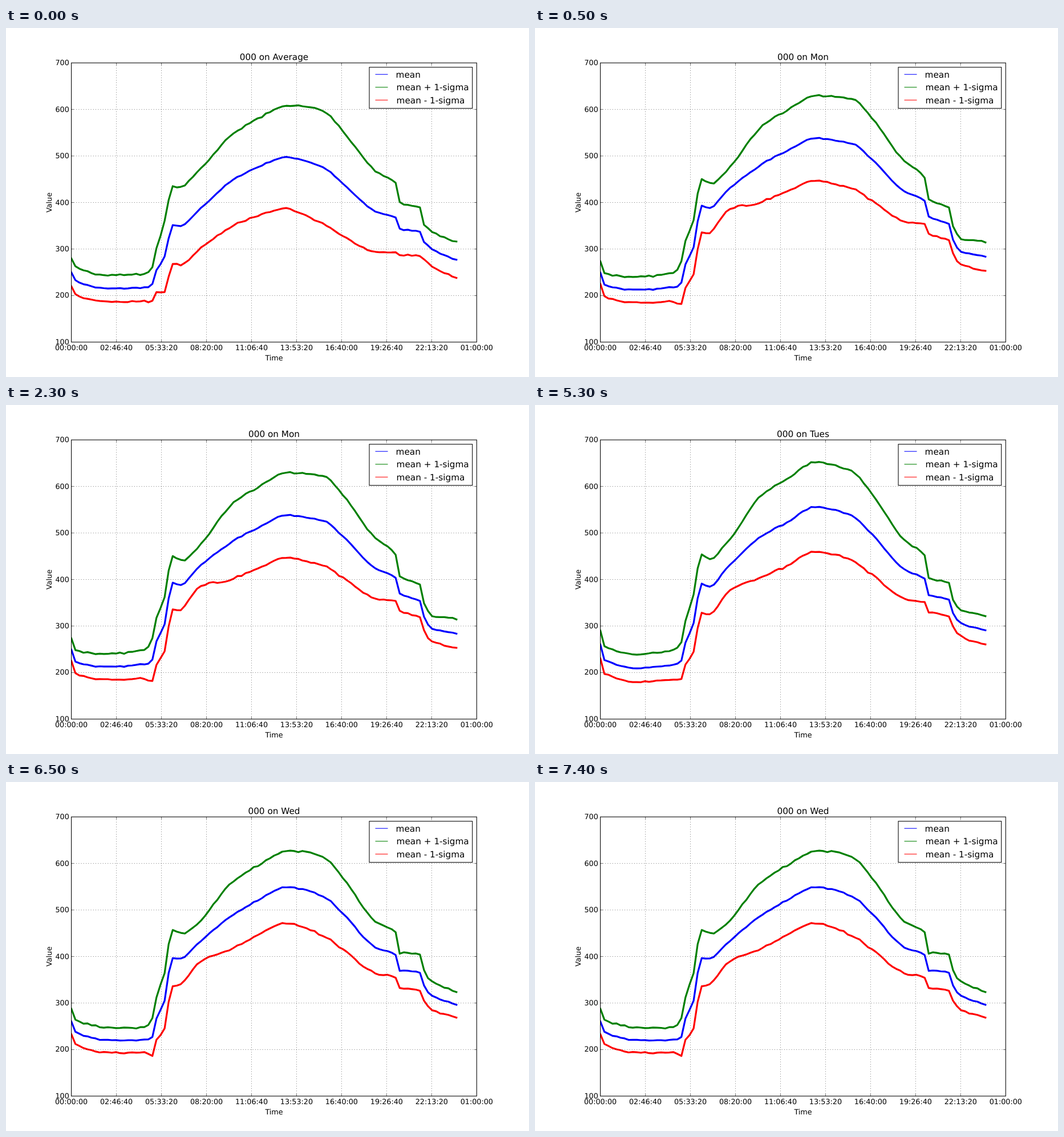
Write an HTML page that moves like this. It is 917 by 611 pixels and loops after 8 s.

```html
<!DOCTYPE html>
<html lang="en">
<head>
<meta charset="utf-8">
<title>Daily profile</title>
<style>
html, body { margin: 0; width: 100%; height: 100%; overflow: hidden; background: #fff; }
svg { display: block; width: 100%; height: 100%; }
text { font: 12.73px "DejaVu Sans", sans-serif; fill: #000; text-anchor: middle; text-rendering: geometricPrecision; }
.big { font-size: 15.28px; }
.end { text-anchor: end; }
.start { text-anchor: start; }
.box { fill: none; stroke: #000; stroke-width: 1.06; }
.key { stroke-width: 1.06; }
.grid { stroke: #000; stroke-width: .53; stroke-dasharray: 1.06 3.18; }
.tick { stroke: #000; stroke-width: .53; }
.curve { fill: none; stroke-width: 3.18; stroke-linejoin: round; stroke-linecap: square; }
.day { visibility: hidden; animation: 8s step-end infinite; }
.avg { animation-name: avg; }
.mon { animation-name: mon; }
.tue { animation-name: tue; }
.wed { animation-name: wed; }
@keyframes avg { 0% { visibility: visible } 6.25%, 100% { visibility: hidden } }
@keyframes mon { 0% { visibility: hidden } 6.25% { visibility: visible } 43.75%, 100% { visibility: hidden } }
@keyframes tue { 0% { visibility: hidden } 43.75% { visibility: visible } 81.25%, 100% { visibility: hidden } }
@keyframes wed { 0% { visibility: hidden } 81.25%, 100% { visibility: visible } }
</style>
</head>
<body>
<svg viewBox="0 0 917 611">
  <defs><clipPath id="plot"><rect x="114.6" y="61.1" width="710.7" height="488.8"/></clipPath></defs>
  <g id="days"></g>
  <g id="axes"></g>
  <g id="legend"></g>
</svg>
<script>
const L = 114.6, R = 825.3, T = 61.1, B = 549.9;
const QUARTERS = 96; // one sample every 15 minutes
const BLUE = '#00f', GREEN = '#008000', RED = '#f00';

const get = id => document.getElementById(id);
const toX = quarter => L + (R - L) * quarter / 100;
const toY = value => B - (B - T) * (value - 100) / 600;

function add(parent, tag, attrs, label) {
  const el = document.createElementNS('http://www.w3.org/2000/svg', tag);
  for (const k in attrs) el.setAttribute(k, attrs[k]);
  if (label) el.textContent = label;
  parent.appendChild(el);
  return el;
}

const line = (parent, cls, x1, y1, x2, y2, stroke) =>
  add(parent, 'line', { class: cls, x1, y1, x2, y2, ...(stroke && { stroke }) });
const text = (parent, cls, x, y, label) => add(parent, 'text', { class: cls, x, y }, label);

// Monotone cubic through the key points
function smooth(xs, ys) {
  const last = xs.length - 1;
  const slope = i => (ys[i + 1] - ys[i]) / (xs[i + 1] - xs[i]);
  const tangent = i => {
    if (i === 0) return slope(0);
    if (i === last) return slope(last - 1);
    const a = slope(i - 1), b = slope(i);
    return a * b > 0 ? 2 * a * b / (a + b) : 0;
  };
  return x => {
    let i = 0;
    while (i < last - 1 && x > xs[i + 1]) i++;
    const h = xs[i + 1] - xs[i], t = (x - xs[i]) / h, u = 1 - t;
    return u * u * (1 + 2 * t) * ys[i] + t * t * (3 - 2 * t) * ys[i + 1]
      + h * t * u * (u * tangent(i) - t * tangent(i + 1));
  };
}

let seed = 7;
function jitter(size) {
  seed = (seed * 16807) % 2147483647;
  return (seed / 2147483647 - .5) * size;
}

// Quarter hours at which mean and sigma change course
const meanAt = [0, 1, 9, 19, 20, 21, 23, 24, 25, 27, 31, 40, 46, 53, 62, 67, 75, 80, 81, 86, 87, 89, 95];
const sigmaAt = [0, 18, 20, 24, 31, 40, 53, 62, 75, 80, 81, 86, 87, 95];

function curve(parent, values, stroke) {
  const points = values.map((v, i) => `${toX(i).toFixed(1)},${toY(v).toFixed(1)}`).join(' ');
  add(parent, 'polyline', { class: 'curve', points, stroke });
}

function day(cls, name, means, sigmas) {
  const g = add(get('days'), 'g', { class: 'day ' + cls });
  text(g, 'big', 470, 55.8, '000 on ' + name);
  const plot = add(g, 'g', { 'clip-path': 'url(#plot)' });
  const sample = f => Array.from({ length: QUARTERS }, (_, i) => f(i) + jitter(2.4));
  const mean = sample(smooth(meanAt, means));
  const sigma = sample(smooth(sigmaAt, sigmas));
  curve(plot, mean, BLUE);
  curve(plot, mean.map((m, i) => m + sigma[i]), GREEN);
  curve(plot, mean.map((m, i) => m - sigma[i]), RED);
}

day('avg', 'Average',
  [251, 232, 215, 218, 224, 254, 284, 322, 351, 349, 380, 449, 476, 497, 476, 440, 381, 367, 343, 338, 316, 300, 276],
  [29, 29, 37, 82, 85, 99, 110, 121, 87, 74, 56, 52, 37, 39]);
day('mon', 'Mon',
  [250, 223, 212, 220, 229, 268, 305, 359, 392, 389, 423, 483, 511, 538, 527, 492, 424, 403, 369, 353, 319, 295, 283],
  [25, 31, 45, 59, 44, 82, 91, 96, 65, 49, 36, 36, 28, 31]);
day('tue', 'Tues',
  [261, 228, 210, 218, 225, 263, 306, 359, 392, 384, 423, 495, 522, 556, 537, 497, 421, 401, 367, 356, 327, 307, 290],
  [29, 31, 40, 64, 54, 89, 96, 95, 63, 50, 36, 36, 28, 31]);
day('wed', 'Wed',
  [260, 238, 220, 221, 228, 267, 305, 365, 397, 396, 426, 490, 521, 549, 530, 492, 420, 403, 370, 366, 337, 316, 296],
  [27, 27, 40, 61, 44, 72, 77, 84, 56, 48, 38, 38, 32, 28]);

const axes = get('axes');
const pad = n => String(Math.floor(n)).padStart(2, '0');
const clock = s => [s / 3600 % 24, s / 60 % 60, s % 60].map(pad).join(':');

for (let i = 0; i < 10; i++) {
  const x = L + (R - L) * i / 9;
  if (i % 9) {
    line(axes, 'grid', x, B, x, T);
    line(axes, 'tick', x, B, x, B - 4.3);
    line(axes, 'tick', x, T, x, T + 4.3);
  }
  text(axes, '', x, 564.3, clock(i * 10000));
}
for (let v = 100; v <= 700; v += 100) {
  const y = toY(v);
  if (v > 100 && v < 700) {
    line(axes, 'grid', L, y, R, y);
    line(axes, 'tick', L, y, L + 4.3, y);
    line(axes, 'tick', R, y, R - 4.3, y);
  }
  text(axes, 'end', 110.8, y + 4, String(v));
}
add(axes, 'rect', { class: 'box', x: L, y: T, width: R - L, height: B - T });
text(axes, '', 470, 582, 'Time');
add(axes, 'text', { transform: 'translate(79.5 305.5) rotate(-90)' }, 'Value');

const legend = get('legend');
add(legend, 'rect', { class: 'box', x: 637, y: 68.7, width: 180.7, height: 72, style: 'fill:#fff' });
[['mean', BLUE], ['mean + 1-sigma', GREEN], ['mean - 1-sigma', RED]].forEach(([label, color], i) => {
  const y = 81.2 + i * 22.5;
  line(legend, 'key', 647.5, y, 669.5, y, color);
  text(legend, 'big start', i ? 684.6 : 683.6, y + 5.5, label);
});
</script>
</body>
</html>
```
